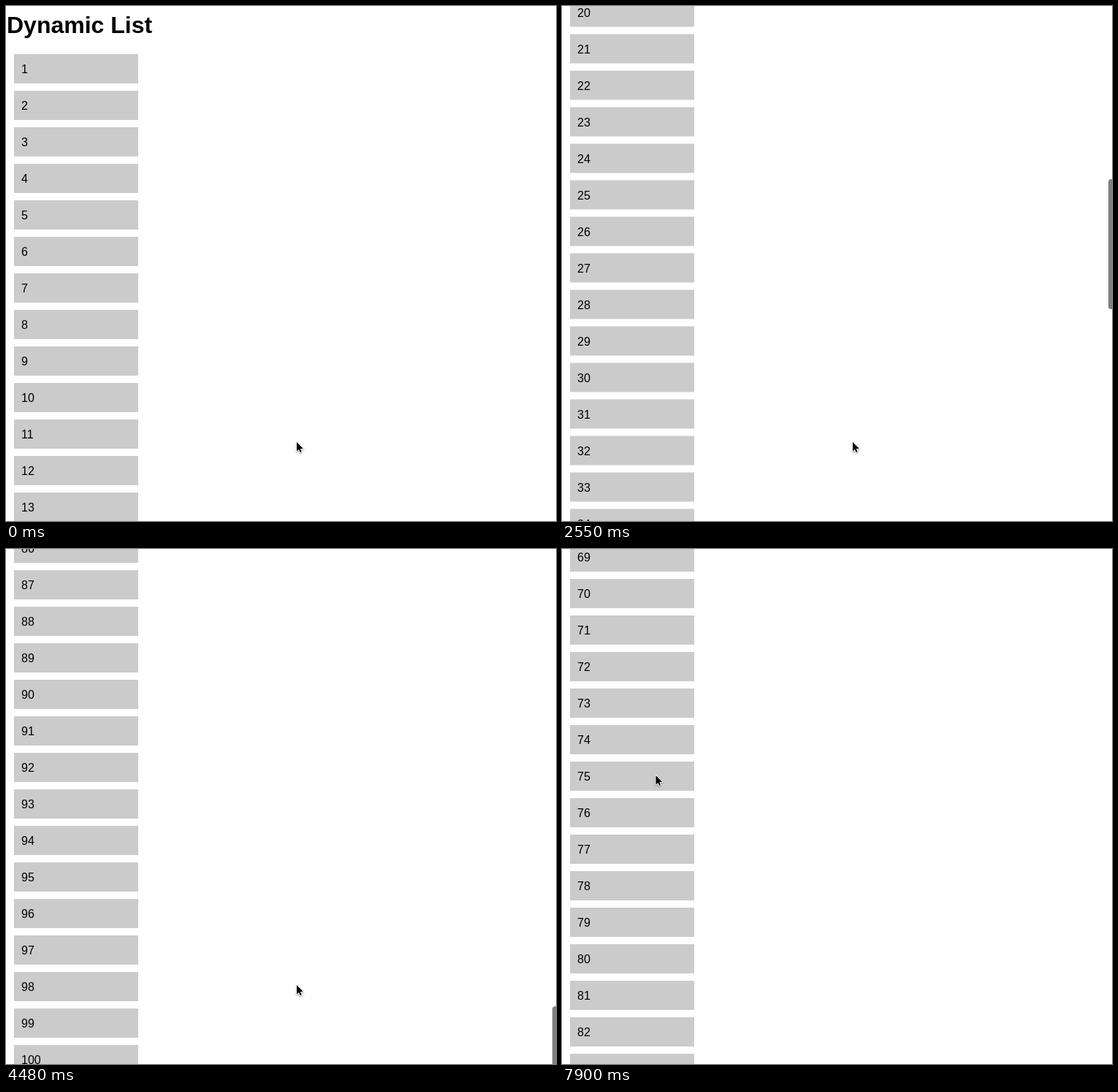
Write an HTML page with a canvas that moves like this. It is 753 px wide and 705 px high and loops after 8000 ms.

```html
<!DOCTYPE html>
<html lang="en">
<head>
<meta charset="utf-8">
<title>Dynamic List</title>
<style>
  html, body { margin: 0; width: 100%; height: 100%; overflow: hidden; background: #fefefe; }
  canvas { display: block; }
</style>
</head>
<body>
<canvas id="stage" width="753" height="705"></canvas>
<script>
const LOOP = 8000, WIDTH = 753, HEIGHT = 705;
const FONT = '"Liberation Sans", Arial, sans-serif';
const ctx = document.getElementById("stage").getContext("2d");

// Each run samples its values one after another, every `step` ms, and holds the last.
const scrollRuns = [
  { start: 0, step: 150, values: [0] },
  { start: 1050, step: 150, values: [12, 70, 170, 295, 411, 540, 690, 830] },
  { start: 2400, step: 148, values: [890, 1027.5, 1290, 1630, 1970, 2240, 2480, 2750, 3050,
                                     3351, 3620, 3850, 4040, 4210, 4337, 4348, 4341, 4338] },
  { start: 5660, step: 150, values: [4332, 4010, 3640, 3475] }
];
const pointerRuns = [
  { start: 0, step: 150, values: [[398, 597]] },
  { start: 5660, step: 150, values: [[317, 369.5]] },
  { start: 7150, step: 150, values: [[292, 350], [246, 316], [201, 295], [165, 290], [140, 300], [128.5, 310]] }
];
const thumbRuns = [
  { start: 0, step: 150, values: [0] },
  { start: 1050, step: 150, values: [1] },
  { start: 5660, step: 150, values: [0, 1] },
  { start: 6700, step: 150, values: [0.5, 0] }
];

function sample(runs, time) {
  const run = runs.findLast(r => r.start <= time);
  // The tolerance absorbs rounding of the capture clock.
  const index = Math.floor((time - run.start + 4) / run.step);
  return run.values[Math.min(index, run.values.length - 1)];
}

// More rows are appended whenever the bottom of the page is reached.
function loadedRows(time, scroll) {
  if (time > 4600 || scroll >= 3830) return 100;
  if (scroll >= 2330) return 90;
  return scroll >= 830 ? 60 : 30;
}

function drawList(scroll, rows) {
  ctx.fillStyle = "#000";
  ctx.font = `bold 32px ${FONT}`;
  ctx.fillText("Dynamic List", 1, 37 - scroll);

  ctx.font = `16px ${FONT}`;
  const first = Math.max(1, Math.floor((scroll - 56) / 50));
  for (let n = first; n <= rows; n++) {
    const top = 16 + 50 * n - scroll;
    if (top > HEIGHT) break;
    ctx.fillStyle = "#cbcbcb";
    ctx.fillRect(11, top, 170, 40);
    ctx.fillStyle = "#000";
    ctx.fillText(n, 21, top + 26);
  }
}

function drawThumb(scroll, rows, alpha) {
  const ratio = 746 / (50 * rows + 66);
  ctx.globalAlpha = alpha;
  ctx.fillStyle = "#7f7f7f";
  ctx.beginPath();
  ctx.roundRect(748, Math.round(scroll * ratio - 13), 8, Math.round(738 * ratio - 1.7), 4);
  ctx.fill();
  ctx.globalAlpha = 1;
}

const arrow = new Path2D("M0 0V12.6L2.9 9.9L4.7 14.1L6.7 13.2L4.9 9.1H8.9Z");

function drawPointer([x, y]) {
  ctx.save();
  ctx.translate(x, y);
  ctx.lineJoin = "round";
  ctx.lineWidth = 2;
  ctx.strokeStyle = "#fff";
  ctx.shadowColor = "rgba(0, 0, 0, 0.4)";
  ctx.shadowBlur = 2;
  ctx.shadowOffsetY = 1;
  ctx.stroke(arrow);
  ctx.shadowColor = "transparent";
  ctx.fillStyle = "#000";
  ctx.fill(arrow);
  ctx.restore();
}

function render(now) {
  const time = now % LOOP;
  const scroll = sample(scrollRuns, time);
  const rows = loadedRows(time, scroll);
  ctx.fillStyle = "#fefefe";
  ctx.fillRect(0, 0, WIDTH, HEIGHT);
  drawList(scroll, rows);
  drawThumb(scroll, rows, sample(thumbRuns, time));
  drawPointer(sample(pointerRuns, time));
}

const started = performance.now();
function tick() {
  render(performance.now() - started);
  requestAnimationFrame(tick);
}
tick();
</script>
</body>
</html>
```
